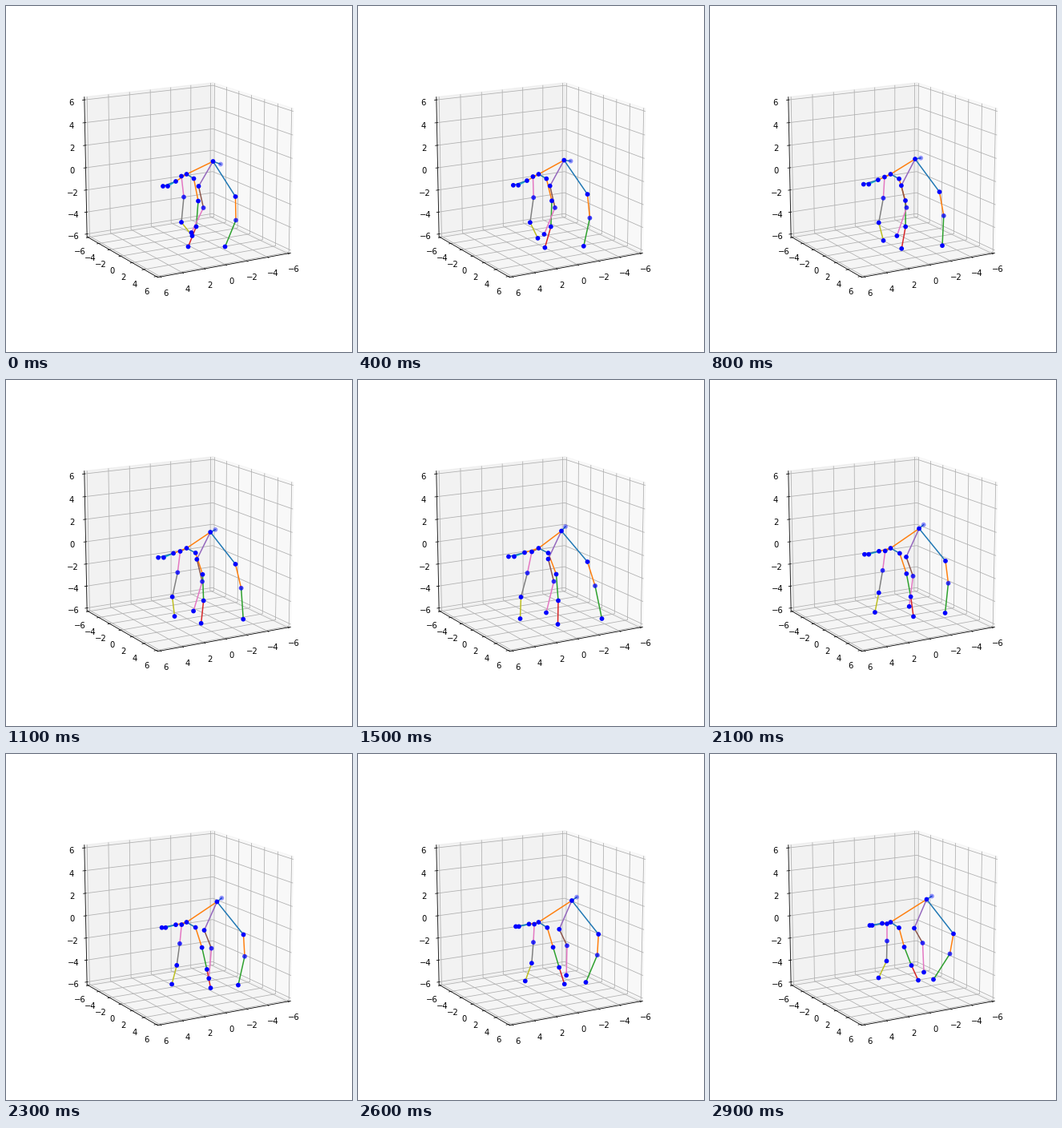
Recreate the animation shown at these times as a matplotlib script. Size 432 by 432 pixels, loop 3 s.

```python
import numpy as np
import matplotlib.pyplot as plt
from matplotlib.animation import FuncAnimation
from matplotlib.collections import LineCollection

SIZE, DPI = 432, 72
FRAMES, INTERVAL = 30, 100

fig = plt.figure(figsize=(SIZE / DPI, SIZE / DPI), dpi=DPI, facecolor="white")
ax = fig.add_axes([0, 0, 1, 1])
ax.set_xlim(0, SIZE)
ax.set_ylim(SIZE, 0)
ax.axis("off")

# Perspective camera around a unit cube
ELEV, AZIM, DIST = np.radians(15), np.radians(60), 10
SCALE = np.array([334.8, 326.16]) / 0.185
CENTER = np.array([225.92, 210.51])
TOWARD = np.array([np.cos(ELEV) * np.cos(AZIM), np.cos(ELEV) * np.sin(AZIM), np.sin(ELEV)])
RIGHT = np.array([-np.sin(AZIM), np.cos(AZIM), 0])
UP = np.cross(TOWARD, RIGHT)


def project(points):
    p = np.asarray(points, float)
    depth = DIST - p @ TOWARD
    return np.stack([CENTER[0] + SCALE[0] * (p @ RIGHT) / depth,
                     CENTER[1] - SCALE[1] * (p @ UP) / depth], axis=-1)


EDGE = 0.5 + 1 / 48
LABEL_GAP = 0.0696
TICKS = range(-6, 7, 2)
FAR = np.array([-EDGE, -EDGE, -EDGE])


def draw_pane(axis, gray):
    u, v = [i for i in range(3) if i != axis]
    corners = []
    for a, b in ((-1, -1), (1, -1), (1, 1), (-1, 1)):
        p = FAR.copy()
        p[u], p[v] = a * EDGE, b * EDGE
        corners.append(p)
    ax.add_patch(plt.Polygon(project(corners), fc=(gray,) * 3, ec=(gray,) * 3,
                             alpha=0.5, lw=1, zorder=0))


def draw_axis(axis, signs, tick_dir):
    """Axis along the box edge given by signs, with grid, ticks and labels."""
    base = np.array(signs, float) * EDGE
    ends = np.array([base, base])
    ends[:, axis] = -EDGE, EDGE
    ax.plot(*project(ends).T, color="black", lw=0.8, zorder=1)

    u, v = [i for i in range(3) if i != axis]
    grid, marks = [], []
    for value in TICKS:
        pos = value / 12
        path = np.array([FAR, FAR, FAR])
        path[0, u] = path[2, v] = EDGE
        path[:, axis] = pos
        grid.append(project(path))

        mark = np.array([base, base])
        mark[:, axis] = pos
        mark[:, tick_dir] += signs[tick_dir] * np.array([0.2, -0.1]) / 12
        marks.append(project(mark))

        spot = base + np.array(signs) * LABEL_GAP
        spot[axis] = pos
        x, y = project(spot)
        ax.text(x, y, str(value).replace("-", "\u2212"), fontsize=10,
                family="DejaVu Sans", ha="center", va="top")
    ax.add_collection(LineCollection(grid, colors="#b0b0b0", linewidths=0.8, zorder=1))
    ax.add_collection(LineCollection(marks, colors="black", linewidths=0.8, zorder=1.5))


for index, shade in enumerate((0.95, 0.9, 0.925)):
    draw_pane(index, shade)
draw_axis(0, (0, 1, -1), 1)
draw_axis(1, (1, 0, -1), 0)
draw_axis(2, (1, -1, 0), 0)

# The neck stays still; every other joint hangs from its parent by a bone
# that swings steadily from its first direction to its middle and last one.
NECK = (225.5, 210)
KEY_TIMES = (0, 1500, 2900)

joints = ["neck"]
bones = []


def bone(parent, joint, color, *swing):
    line, = ax.plot([], [], color="tab:" + color, lw=1.5, zorder=3)
    bones.append((line, joints.index(parent), np.transpose(swing)))
    joints.append(joint)


bone("neck", "shoulder1", "blue", (9, 5.5), (12, 6), (10.5, 7))
bone("shoulder1", "elbow1", "orange", (5.5, 28), (10, 26.5), (6.5, 24))
bone("elbow1", "wrist1", "green", (-2.5, 32), (2.5, 33), (9, 23))
bone("wrist1", "paw1", "red", (-10, 25), (-0.5, 29.5), (8.5, 18.5))

bone("neck", "shoulder2", "brown", (-6.5, 2.5), (-8.5, 4.5), (-4.5, 2))
bone("shoulder2", "elbow2", "pink", (3, 26), (-5.5, 26.5), (0, 21.5))
bone("elbow2", "wrist2", "gray", (-3, 31.5), (-8, 30), (-0.5, 25))
bone("wrist2", "paw2", "olive", (13.5, 17), (-1, 27), (-10, 21))

bone("neck", "head", "orange", (-13.5, 9), (-17.5, 5.5), (-10.5, 1.5))
bone("head", "ear1", "cyan", (-10, 6), (-13, 5), (-12.5, 2.5))
bone("head", "ear2", "blue", (-16, 6), (-20, 5), (-15.5, 2.5))

bone("neck", "rump", "orange", (33, -16), (28.5, -21.5), (45, -28.5))
bone("rump", "tail", "blue", (9.5, 3.5), (5, -5.5), (6.5, -4))

bone("rump", "knee1", "blue", (28, 44), (32.5, 38.5), (33.5, 43))
bone("knee1", "ankle1", "orange", (0.5, 29.5), (9.5, 30), (-4.5, 25))
bone("ankle1", "foot1", "green", (-13.5, 33), (8.5, 41), (-20.5, 32))

bone("rump", "knee2", "purple", (-18, 31), (-16.5, 35), (-15.5, 36))
bone("knee2", "ankle2", "brown", (6, 27), (7, 28), (10.5, 18.5))
bone("ankle2", "foot2", "pink", (-15, 31), (-9.5, 39), (1.5, 36.5))

# Joints further from the viewer are paler
PALE = {"tail": 0.42, "elbow2": 0.8, "ankle1": 0.75, "ankle2": 0.8}
dots = ax.scatter([0] * len(joints), [0] * len(joints), s=33, lw=0, zorder=4,
                  color=[(0, 0, 1, PALE.get(name, 1)) for name in joints])


def update(frame):
    t = frame * INTERVAL
    pose = [np.array(NECK)]
    for line, parent, swing in bones:
        start = pose[parent]
        end = start + [np.interp(t, KEY_TIMES, row) for row in swing]
        line.set_data(*np.transpose([start, end]))
        pose.append(end)
    dots.set_offsets(pose)
    return [line for line, *_ in bones] + [dots]


anim = FuncAnimation(fig, update, frames=FRAMES, interval=INTERVAL, repeat=True)
plt.show()
```
